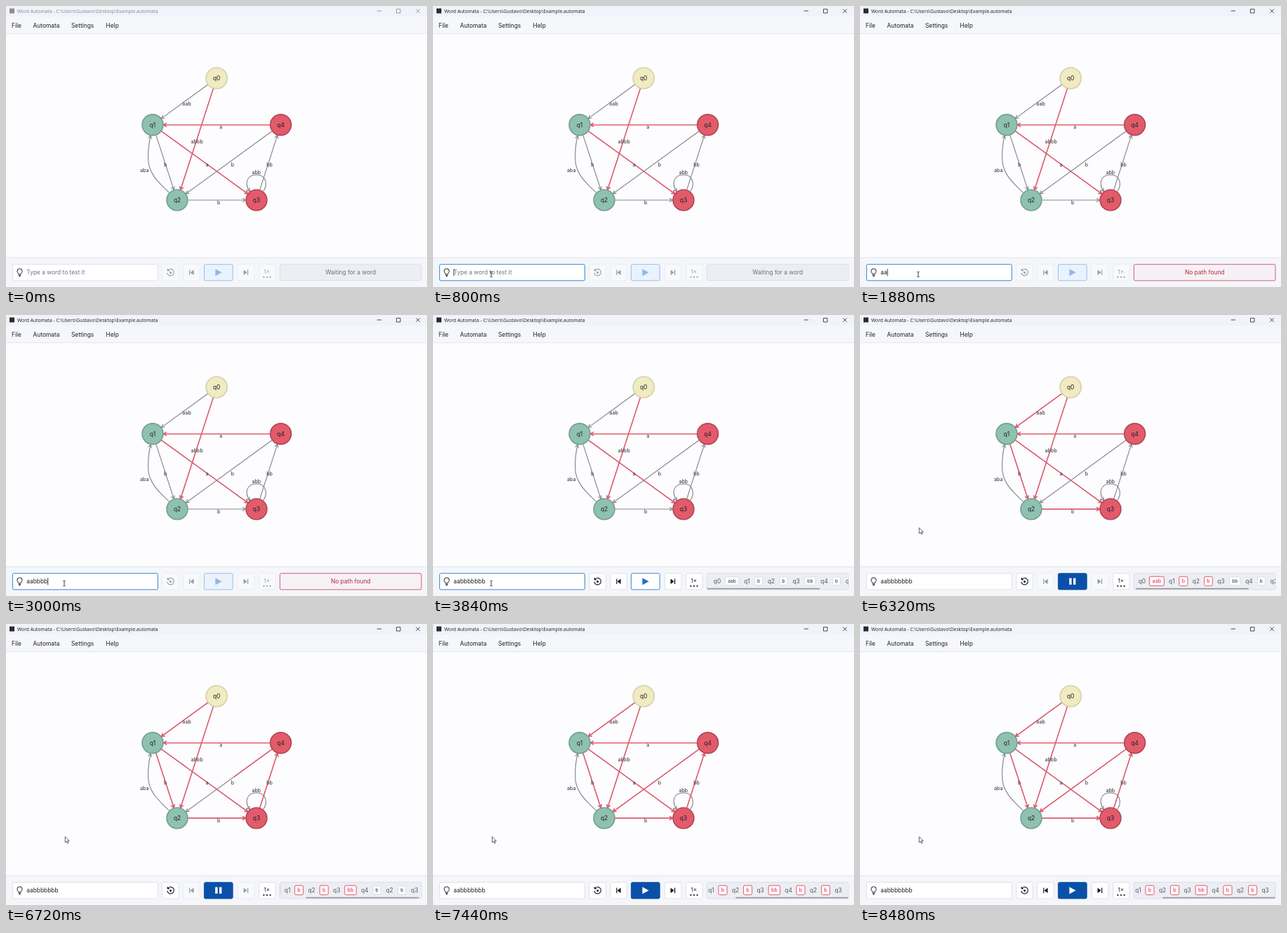
These frames come from a looping animation (600x401 px, 8.52 s). An HTML page:

```html
<!DOCTYPE html>
<html lang="en">
<head>
<meta charset="utf-8">
<title>Word Automata</title>
<style>
  html, body { margin: 0; width: 100%; height: 100%; overflow: hidden; background: #fdfcfe; }
  svg { display: block; width: 100vw; height: 100vh; }
  text { font: 8.4px Inter, sans-serif; fill: #1d1f23; }
  .mid { text-anchor: middle; }
  .title { font: 6.75px "Open Sans", sans-serif; }
  .off { opacity: .4; }
  .line { fill: none; stroke: #87878c; stroke-width: 1.15; }
  .hot { stroke: #e8576b; stroke-width: 1.4; }
  .label { font-size: 7.2px; fill: #2c2d31; }
  .box { fill: #fff; stroke: #d3d7e0; stroke-width: .7; }
  .chip rect { fill: #fff; stroke: #cfd3db; stroke-width: .7; }
  .chip text { font-size: 6.6px; font-weight: 500; fill: #44474e; }
  .chip.on rect { stroke: #e2566b; stroke-width: .9; }
  .chip.on text { fill: #e2455c; }
  .state { fill: #555a64; }
</style>
</head>
<body>
<svg id="stage" viewBox="0 0 600 401" preserveAspectRatio="none">
  <defs><clipPath id="clip"><rect x="390.5" y="369" width="201.5" height="23"/></clipPath></defs>
  <rect width="600" height="401" fill="#fdfcfe"/>
  <rect width="600" height="15" fill="#f0f3f9"/>
  <rect y="15" width="600" height="24.5" fill="#f5f7fb"/>
  <path d="M0 39.5H600" stroke="#dfe2ea" stroke-width=".8"/>
  <g id="caption">
    <rect x="5" y="3.5" width="7" height="7" fill="#2b2b2e"/>
    <text class="title" x="16" y="9.7">Word Automata - C:\Users\Gustavo\Desktop\Example.automata</text>
    <path d="M528.7 7H535M556.5 4.5H562V10H556.5ZM584.3 4.4L589.8 9.9M589.8 4.4L584.3 9.9" fill="none" stroke="#222" stroke-width=".8"/>
  </g>
  <text x="8" y="30.9">File</text>
  <text x="38.5" y="30.9">Automata</text>
  <text x="93" y="30.9">Settings</text>
  <text x="142.5" y="30.9">Help</text>

  <g id="edges"></g>
  <g id="labels"></g>
  <g id="nodes"></g>

  <rect y="359" width="600" height="42" fill="#f4f6fa"/>
  <path d="M0 359.2H600" stroke="#dcdfe7" stroke-width=".8"/>

  <rect id="field" class="box" x="9.4" y="368.7" width="207" height="23.2" rx="2"/>
  <g fill="none" stroke="#1c1d20" stroke-width="1">
    <path d="M17.8 382.8C17.8 381.2 15.9 380.6 15.9 378.4A3.6 3.6 0 0 1 23.1 378.4C23.1 380.6 21.2 381.2 21.2 382.8Z"/>
    <path d="M17.8 384.4H21.2M18.4 385.9H20.6"/>
  </g>
  <text id="hint" x="29.3" y="383" style="fill:#71757d">Type a word to test it</text>
  <text id="word" x="29.3" y="383"></text>
  <path id="caret" d="M0 375.2V385.4" stroke="#111" stroke-width=".8"/>

  <g id="reset">
    <rect class="box" x="222.8" y="368.7" width="23.6" height="23.2" rx="2"/>
    <path d="M231.2 376.6A4.8 4.8 0 1 1 229.8 380.8" fill="none" stroke="#16171a" stroke-width="1.2"/>
    <path d="M229.7 374.4V378.3H233.6Z" fill="#16171a"/>
    <circle cx="234.6" cy="380.5" r="1.5" fill="#16171a"/>
  </g>
  <g id="prev">
    <rect class="box" x="252.8" y="368.7" width="23.4" height="23.2" rx="2"/>
    <path d="M261.2 376.6H262.4V384H261.2ZM267.6 376.6V384L262.6 380.3Z" fill="#16171a"/>
  </g>
  <g id="next">
    <rect class="box" x="330.4" y="368.7" width="23.6" height="23.2" rx="2"/>
    <path d="M345.2 376.6H344V384H345.2ZM338.6 376.6V384L343.6 380.3Z" fill="#16171a"/>
  </g>
  <g id="speed">
    <rect class="box" x="360.6" y="368.7" width="23.4" height="23.2" rx="2"/>
    <text class="mid" x="371.8" y="381.6" style="font-size:8px">1×</text>
    <g fill="#16171a"><circle cx="367.4" cy="386.8" r="1.1"/><circle cx="372" cy="386.8" r="1.1"/><circle cx="376.6" cy="386.8" r="1.1"/></g>
  </g>
  <g id="play">
    <rect id="playBox" x="282.4" y="368.7" width="40.8" height="23.2" rx="2" stroke-width=".9"/>
    <path id="playIcon"/>
  </g>

  <rect id="status" x="390.4" y="368.7" width="201.6" height="23.2" rx="2" stroke-width=".8"/>
  <text id="message" class="mid" x="491.2" y="383.2"></text>
  <g id="track" clip-path="url(#clip)">
    <g id="strip"></g>
    <rect id="thumb" x="390.4" y="389.7" width="161" height="1.9" rx=".9" fill="#97999f"/>
  </g>

  <path id="arrow" d="M0 0V8.2L1.9 6.5L3.2 9.4L4.6 8.8L3.3 6H5.9Z" fill="#fff" stroke="#222" stroke-width=".7"/>
  <path id="beam" d="M-1.7 -3.7Q0 -3.7 0 -2.9Q0 -3.7 1.7 -3.7M0 -2.9V2.9M-1.7 3.7Q0 3.7 0 2.9Q0 3.7 1.7 3.7" fill="none" stroke="#111" stroke-width=".8"/>
</svg>
<script>
const LOOP = 8520;
const FOCUS = 620, HOVER_FROM = 4250, HOVER_TO = 4740, PRESS = 5000, CLICK = 5080;
const LEAVE_TO = 5600, RUN = 5430, STEP = 290, WAIT = 20, DRAW = 250;
const TEXT = 'aabbbbbbb';
const KEYS = [1360, 1700, 2080, 2400, 2660, 2920, 3120, 3205, 3290];
const RED = '#e25b6b', TEAL = '#8fc1b0';

const $ = id => document.getElementById(id);
function make(tag, attrs, parent, text) {
  const el = document.createElementNS('http://www.w3.org/2000/svg', tag);
  for (const k in attrs) el.setAttribute(k, attrs[k]);
  if (text) el.textContent = text;
  parent.appendChild(el);
  return el;
}
const set = (el, attrs) => { for (const k in attrs) el.setAttribute(k, attrs[k]); };
const show = (el, on) => { el.style.display = on ? '' : 'none'; };
const clamp = v => Math.max(0, Math.min(1, v));
const ease = v => { v = clamp(v); return v * v * (3 - 2 * v); };

// Graph
const nodes = {
  q0: [300.2, 103, '#f0ebc0', '#d6d1a6'],
  q1: [209, 169.6, TEAL, '#6a9c8b'],
  q2: [244, 277, TEAL, '#6a9c8b'],
  q3: [357, 277, RED, '#ae3f4e'],
  q4: [391.6, 169.6, RED, '#ae3f4e']
};
const R = 15.6;
for (const name in nodes) {
  const [x, y, fill, stroke] = nodes[name];
  make('circle', { cx: x, cy: y, r: R + .7, fill: '#000', opacity: .08 }, $('nodes'));
  make('circle', { cx: x, cy: y, r: R - .7, fill, stroke, 'stroke-width': 1.4 }, $('nodes'));
  make('text', { x, y: y + 3, class: 'mid' }, $('nodes'), name);
}

function head(x, y, angle, cls) {
  const wing = s => `${x - 5 * Math.cos(angle + s)} ${y - 5 * Math.sin(angle + s)}`;
  return make('path', { d: `M${wing(.55)}L${x} ${y}L${wing(-.55)}`, class: cls }, $('edges'));
}
const label = (text, x, y) => make('text', { x, y: y + 2.4, class: 'mid label' }, $('labels'), text);

function edge(from, to, text, lx, ly) {
  const [x1, y1] = nodes[from], [x2, y2] = nodes[to];
  const a = Math.atan2(y2 - y1, x2 - x1), dx = R * Math.cos(a), dy = R * Math.sin(a);
  const d = `M${x1 + dx} ${y1 + dy}L${x2 - dx} ${y2 - dy}`;
  make('path', { d, class: 'line' }, $('edges'));
  head(x2 - dx, y2 - dy, a, 'line');
  label(text, lx, ly);
  return {
    line: make('path', { d, class: 'line hot', pathLength: 1 }, $('edges')),
    tip: head(x2 - dx, y2 - dy, a, 'line hot')
  };
}
const aab = edge('q0', 'q1', 'aab', 257.6, 140);
edge('q0', 'q2', 'abbb', 272.2, 193.5);
edge('q4', 'q1', 'a', 306.2, 173);
edge('q1', 'q3', 'a', 286.6, 226.8);
const b12 = edge('q1', 'q2', 'b', 227.2, 226.4);
const b42 = edge('q4', 'q2', 'b', 323, 226.4);
const b23 = edge('q2', 'q3', 'b', 303.2, 280.4);
const bb = edge('q3', 'q4', 'bb', 375.6, 226.4);
const hot = [aab, b12, b23, bb, b42];

make('path', { d: 'M232.4 266.2C214 249 202.6 237 202.6 217C202.6 204 203.6 195 206.2 185', class: 'line' }, $('edges'));
head(206.2, 185, -1.3, 'line');
label('aba', 197.2, 234.6);
make('path', { d: 'M366.6 264.4C372.5 257 372.5 241 357 241C341.5 241 340.5 255 347.2 264.6', class: 'line' }, $('edges'));
head(347.2, 264.6, 1, 'line');
label('abb', 356.8, 237.2);

// Path strip: states and chips alternate
const route = [['q0', 405], ['aab', 426], ['q1', 447.5], ['b', 464], ['q2', 482], ['b', 499.6], ['q3', 517.6],
  ['bb', 537.4], ['q4', 557.6], ['b', 575], ['q2', 593], ['b', 610.6], ['q3', 628.6]];
const items = route.map(([text, x], i) => {
  if (i % 2 === 0) return make('text', { x, y: 383, class: 'mid state' }, $('strip'), text);
  const g = make('g', {}, $('strip')), w = 7 + 4 * text.length;
  make('rect', { x: -w / 2, y: -6, width: w, height: 12, rx: 1.6 }, g);
  make('text', { x: 0, y: 2.4, class: 'mid' }, g, text);
  return g;
});
const lengths = { 5: 7, 7: 9, 9: 13 };   // typed letters -> strip items of an accepted word

const doneAt = k => RUN + k * STEP + WAIT + DRAW;

function scrollAt(t) {
  let pos = 0;
  [[2, 8.5], [3, 46.4], [4, 51]].forEach(([k, goal]) => { pos += (goal - pos) * ease((t - doneAt(k)) / 100); });
  return pos;
}

function drawPointer(t) {
  const go = ease((t - HOVER_FROM) / (HOVER_TO - HOVER_FROM));
  const back = ease((t - 5140) / (LEAVE_TO - 5140));
  let x = 83 + 205 * go, y = 383 - 6.6 * go;
  x += (84.3 - x) * back;
  y += (303.6 - y) * back;
  const seen = t >= 400, inField = x < 216 && y > 369;
  show($('beam'), seen && inField);
  show($('arrow'), seen && !inField);
  const at = { transform: `translate(${x} ${y})` };
  set($('beam'), at);
  set($('arrow'), at);
  return x > 282 && y > 368.7;
}

function drawField(t, n) {
  const focused = t >= FOCUS && t < PRESS;
  $('field').style.stroke = focused ? '#3584cf' : '';
  $('field').style.strokeWidth = focused ? 1 : '';
  show($('hint'), n === 0);
  $('word').textContent = TEXT.slice(0, n);
  const since = t - (n ? KEYS[n - 1] : FOCUS);
  show($('caret'), focused && Math.floor(since / 530) % 2 === 0);
  const w = n ? $('word').getComputedTextLength() : 0;
  set($('caret'), { transform: `translate(${29.8 + w} 0)` });
}

function drawButtons(t, found, over) {
  const running = t >= CLICK && t < RUN + 6 * STEP;
  const dim = (id, off) => $(id).setAttribute('class', off ? 'off' : '');
  dim('reset', !found);
  dim('speed', !found);
  dim('prev', !found || running);
  dim('next', !found || running);
  const [fill, stroke, icon] = !found ? ['#eaf2fc', '#8fb9e8', '#90b9e7']
    : t >= CLICK ? ['#0b50a8', '#0b50a8', '#fff']
    : over ? ['#2277d6', '#2277d6', '#fff']
    : ['#fff', '#2a7bd0', '#1d72cf'];
  set($('playBox'), { fill, stroke });
  set($('playIcon'), {
    fill: icon,
    d: running ? 'M298.2 375.6H301.6V384.8H298.2ZM304 375.6H307.4V384.8H304Z' : 'M298.4 375.2L307.6 380.2L298.4 385.2Z'
  });
}

function drawStatus(t, n, count) {
  const none = n > 0 && !count;
  set($('status'), { fill: none ? '#f5f1f5' : '#eceef4', stroke: none ? '#c73c52' : '#d7dae3' });
  $('message').textContent = count ? '' : none ? 'No path found' : 'Waiting for a word';
  $('message').style.fill = none ? '#b7253d' : '#6a6f79';
  show($('track'), count > 0);
  const pos = scrollAt(t);
  set($('strip'), { transform: `translate(${-pos} 0)` });
  set($('thumb'), { transform: `translate(${pos * .8} 0)` });
  show($('thumb'), count === route.length);
  items.forEach((el, i) => {
    show(el, i < count);
    if (i % 2 === 0) return;
    const p = clamp((t - doneAt((i - 1) / 2)) / 60);
    set(el, { class: p ? 'chip on' : 'chip', transform: `translate(${route[i][1]} 379.8) scale(${1 + .1 * p})` });
  });
}

function drawRun(t) {
  hot.forEach(({ line, tip }, k) => {
    const p = clamp((t - RUN - k * STEP - WAIT) / DRAW);
    show(line, p > 0);
    show(tip, p === 1);
    set(line, { 'stroke-dasharray': `${p} 2` });
  });
}

const start = performance.now();
function frame() {
  const t = (performance.now() - start) % LOOP;
  const n = KEYS.filter(k => k <= t).length;
  const count = lengths[n] || 0;
  $('caption').style.opacity = t < FOCUS ? .5 : 1;
  drawField(t, n);
  drawButtons(t, count > 0, drawPointer(t));
  drawStatus(t, n, count);
  drawRun(t);
  requestAnimationFrame(frame);
}
frame();
</script>
</body>
</html>
```
